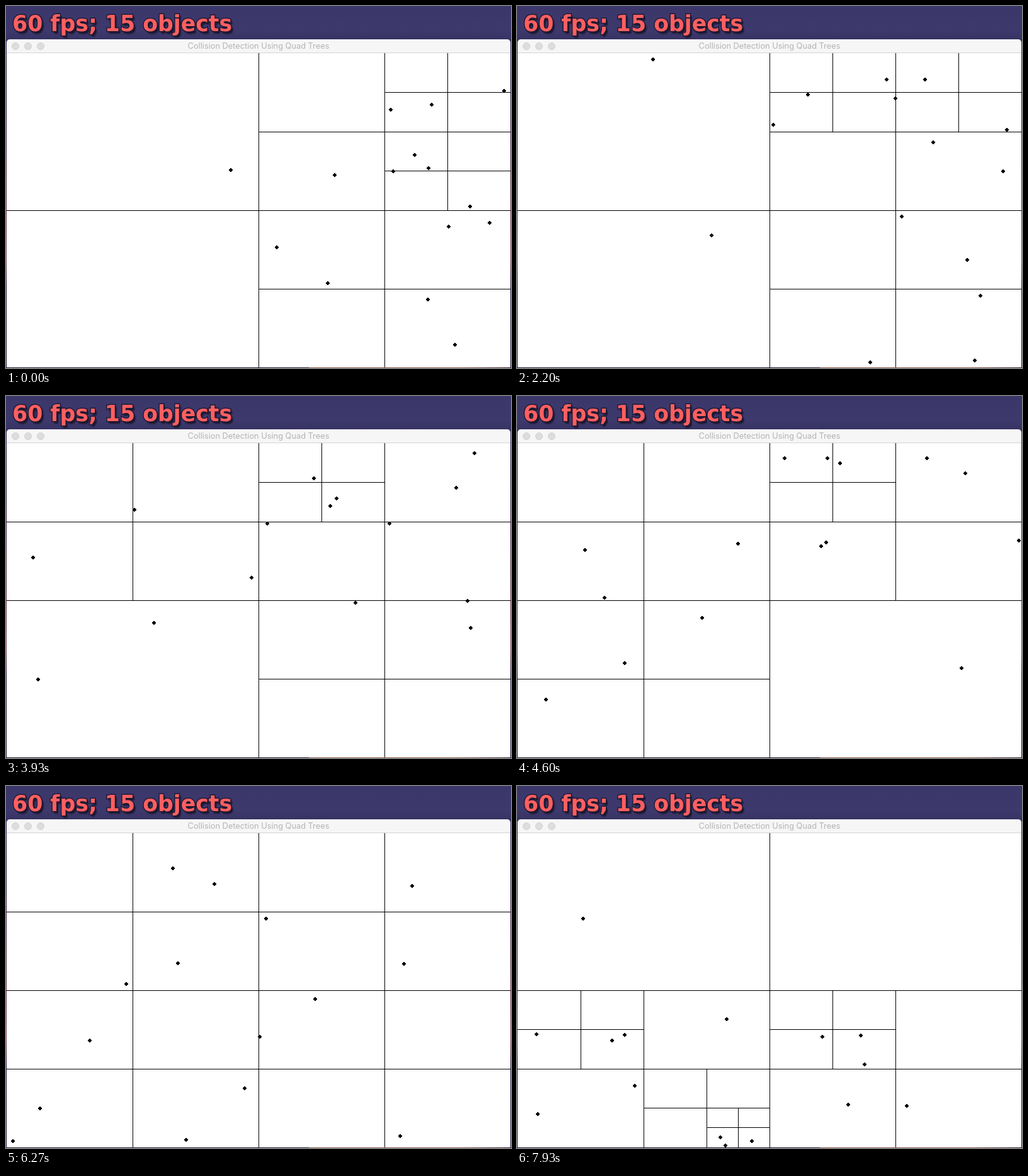
Recreate the animation shown at these times as an HTML page with a canvas. Size 802x576 px, loop 8 s.

```html
<!DOCTYPE html>
<html lang="en">
<head>
<meta charset="utf-8">
<title>Quad tree</title>
<style>
  html, body { margin: 0; width: 100%; height: 100%; overflow: hidden; }
  body { position: relative; background: #2a2647; }
  .desktop {
    position: absolute; left: 0; top: 0; width: 802px; height: 576px;
    background: linear-gradient(#3b376a, #3d396d 40px, #35315f 56px, #282443 120px,
      #5a3545 300px, #84505a 400px, #2a2140 450px, #221e3c);
  }
  .desktop::after {
    content: ""; position: absolute; left: 0; right: 0; bottom: 0; height: 1px;
    background: linear-gradient(90deg, #1d1a30 60%, #8a5a4c 60%, #8a5a4c 90%, #2a2030);
  }
  h1 {
    position: absolute; left: 10px; top: 8px; margin: 0; white-space: nowrap;
    font: bold 34.7px/40px "DejaVu Sans", sans-serif; color: #ff5f60;
    -webkit-text-stroke: 3px #211c38; paint-order: stroke fill;
    text-shadow: 2px 2px 1px #1d1931, 3px 4px 2px #1d1931;
  }
  .bar {
    position: absolute; left: 1px; top: 53px; width: 800px; height: 22px;
    box-sizing: border-box; border-bottom: 1px solid #d4d4d4;
    border-radius: 5px 5px 0 0; background: #f6f6f6; color: #b4b4b4;
    font: 12.8px/22px Inter, sans-serif; text-align: center;
  }
  .bar i {
    position: absolute; top: 5px; width: 12px; height: 12px; box-sizing: border-box;
    border: 1px solid #d1d1d1; border-radius: 50%; background: #dddddd;
  }
  canvas { position: absolute; left: 1px; top: 75px; }
</style>
</head>
<body>
<div class="desktop"></div>
<div class="bar">
  <i style="left:8px"></i><i style="left:28px"></i><i style="left:48px"></i>
  Collision Detection Using Quad Trees
</div>
<h1>60 fps; 15 objects</h1>
<canvas width="800" height="500"></canvas>
<script>
const W = 800, H = 500, LOOP = 8000, FRAMES = 120, CAPACITY = 2, MAX_DEPTH = 8;
const ctx = document.querySelector('canvas').getContext('2d');

const launch = (vx, vy, ...points) => points.map(([x, y]) => ({ x, y, vx, vy }));

// Objects grouped by their shared velocity
const objects = [
  launch(2, 3, [356, 186], [510, 366], [670, 183]),
  launch(-3, -2, [521, 194], [767, 270]),
  launch(1, -2, [675, 82], [669, 392]),
  launch(-1, -2, [702, 276], [712, 464]),
  launch(3, 3, [429, 309]),
  launch(-2, -2, [610, 90]),
  launch(-2, -1, [790, 60]),
  launch(3, -2, [648, 162]),
  launch(-3, 1, [614, 188]),
  launch(2, -1, [736, 244])
].flat();

// Steady rate, with a short slowdown that is caught up again
function tickAt(frame) {
  const lag = 1.2 + 3.2 * Math.exp(-(((frame - 27) / 12) ** 2));
  return Math.max(0, Math.round(3.2 * frame - lag));
}

// Step along one axis, clamped at the walls, turning round on contact
function travel(pos, vel, max, ticks) {
  while (ticks-- > 0) {
    pos = Math.min(max, Math.max(0, pos + vel));
    if (pos === 0 || pos === max) vel = -vel;
  }
  return pos;
}

function drawTree(points, x, y, w, h, depth = 0) {
  if (points.length <= CAPACITY || depth === MAX_DEPTH) return;
  const hw = w / 2, hh = h / 2, mx = x + hw, my = y + hh;
  ctx.fillRect(Math.floor(mx), Math.floor(y), 1, Math.ceil(h));
  ctx.fillRect(Math.floor(x), Math.floor(my), Math.ceil(w), 1);
  for (const right of [false, true])
    for (const low of [false, true]) {
      const inside = points.filter(p => (p.x >= mx) === right && (p.y >= my) === low);
      drawTree(inside, right ? mx : x, low ? my : y, hw, hh, depth + 1);
    }
}

// Pixel disc, six wide
function drawBall({ x, y }) {
  for (let r = 1; r <= 3; r++) ctx.fillRect(x - r, y - 4 + r, 2 * r, 8 - 2 * r);
}

function render(frame) {
  const ticks = tickAt(frame);
  const balls = objects.map(o => ({
    x: travel(o.x, o.vx, W, ticks),
    y: travel(o.y, o.vy, H, ticks)
  }));
  ctx.fillStyle = '#fff';
  ctx.fillRect(0, 0, W, H);
  ctx.fillStyle = '#000';
  drawTree(balls, 0, 0, W, H);
  balls.forEach(drawBall);
}

const began = performance.now();
let shown = -1;
function loop() {
  const t = (performance.now() - began) % LOOP;
  const frame = Math.min(FRAMES - 1, Math.floor((t + 4) * FRAMES / LOOP));
  if (frame !== shown) render(shown = frame);
  requestAnimationFrame(loop);
}
loop();
</script>
</body>
</html>
```
